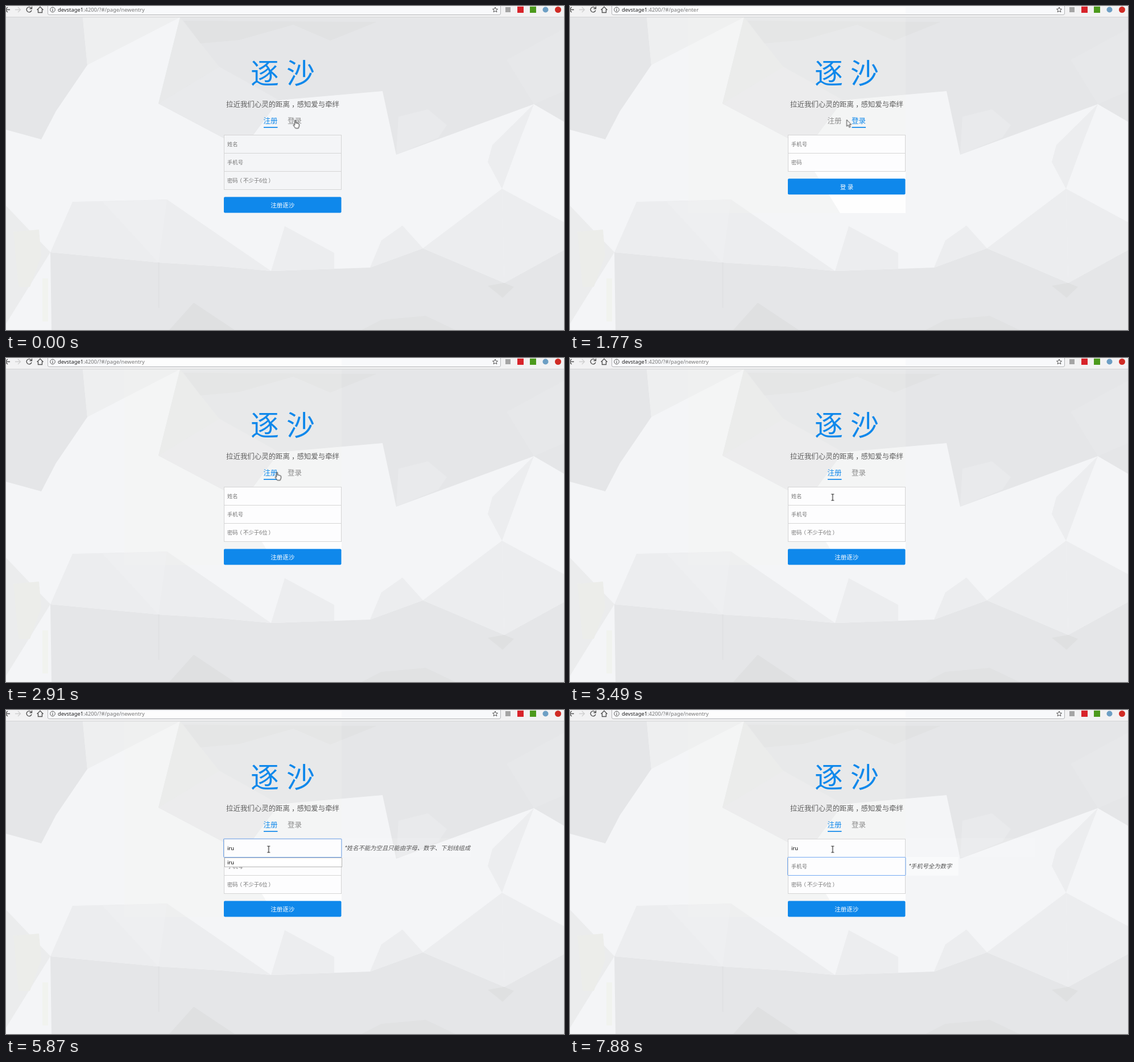
These frames come from a looping animation (981 px wide and 571 px high, 8 s). An HTML page:

```html
<!DOCTYPE html>
<html lang="zh-CN">
<head>
<meta charset="utf-8">
<title>注册</title>
<style>
html, body { margin: 0; width: 100%; height: 100%; overflow: hidden; background: #f4f5f7; }
svg { display: block; width: 981px; height: 571px; }
text { font-family: "Noto Sans CJK SC", "Noto Sans CJK", "Noto Sans", sans-serif; white-space: pre; }
.latin { font-family: "Noto Sans", "Open Sans", sans-serif; }
.url { font-size: 9.35px; fill: #777; }
.url tspan { fill: #222; }
.title { font-size: 50px; fill: #0f88eb; }
.slogan { font-size: 12.44px; fill: #5e5e5e; }
.tab { font-size: 12.5px; fill: #8c8c8c; }
.on { fill: #0f88eb; }
.hint { font-size: 9.33px; fill: #757575; }
.typed { font-size: 9.33px; fill: #000; }
.tip { font-size: 10.35px; font-style: italic; fill: #555; }
.btn { font-size: 10.5px; fill: #fff; text-anchor: middle; }
.field { fill: #fdfdfe; stroke: #d5d5d5; }
.ring { fill: none; stroke: #74a9f3; }
.caret { fill: #000; }
.icon { fill: none; stroke: #555; stroke-width: 1.4; }

/* every change is a hard cut on one 8 s clock */
.k { animation: 8s step-end infinite; }
.ghost { animation-name: ghost; }
.register { animation-name: register; }
.login { animation-name: login; }
.register .field { animation-name: whiten; }
.focus1 { animation-name: focus1; }
.focus2 { animation-name: focus2; }
.glow1 { animation-name: glow1; }
.empty { animation-name: empty; }
.first { animation-name: first; }
.full { animation-name: full; }
.caret1 { animation-name: caret1; }
.caret2 { animation-name: caret2; }
.popup { animation-name: popup; }
.hand { animation-name: hand; }
.arrow { animation-name: arrow; }
.beam { animation-name: beam; }

@keyframes ghost { 0% { opacity: 0 } 3.5% { opacity: 1 } }
@keyframes register { 0% { opacity: 1 } 3.5% { opacity: 0 } 36.375% { opacity: 1 } }
@keyframes login { 0% { opacity: 0 } 3.5% { opacity: 1 } 36.375% { opacity: 0 } }
@keyframes whiten { 0% { fill: #f4f5f7 } 3.5% { fill: #fdfdfe } }
@keyframes focus1 { 0% { opacity: 0 } 49.125% { opacity: 1 } 78.75% { opacity: 0 } }
@keyframes focus2 { 0% { opacity: 0 } 78.75% { opacity: 1 } }
@keyframes glow1 { 0% { opacity: 0 } 49.125% { opacity: 1 } }
@keyframes empty { 0% { opacity: 1 } 63.625% { opacity: 0 } }
@keyframes first { 0% { opacity: 0 } 63.625% { opacity: 1 } 66.75% { opacity: 0 } }
@keyframes full { 0% { opacity: 0 } 66.75% { opacity: 1 } }
@keyframes popup { 0% { opacity: 0 } 63.625% { opacity: 1 } 78.75% { opacity: 0 } }
@keyframes caret1 {
  0% { opacity: 0; transform: none }
  49.125% { opacity: 1; transform: none }
  54.875% { opacity: 0; transform: none }
  62.125% { opacity: 1; transform: none }
  63.625% { opacity: 1; transform: translateX(2px) }
  66.75% { opacity: 1; transform: translateX(12px) }
  73.375% { opacity: 0; transform: none }
}
@keyframes caret2 {
  0% { opacity: 0 } 78.75% { opacity: 1 } 85.25% { opacity: 0 }
  91.5% { opacity: 1 } 98.5% { opacity: 0 }
}
@keyframes hand {
  0% { opacity: 1; transform: translate(504.5px, 200.5px) }
  20.25% { opacity: 1; transform: translate(493px, 200.5px) }
  22.125% { opacity: 0; transform: none }
  24% { opacity: 1; transform: translate(472.5px, 200.5px) }
  25.5% { opacity: 0; transform: none }
  27.375% { opacity: 1; transform: translate(472.5px, 200.5px) }
  34.375% { opacity: 0; transform: none }
  36.375% { opacity: 1; transform: translate(472.5px, 200.5px) }
  38.25% { opacity: 0; transform: none }
}
@keyframes arrow {
  0% { opacity: 0; transform: none }
  22.125% { opacity: 1; transform: translate(486.5px, 200.5px) }
  24% { opacity: 0; transform: none }
  25.5% { opacity: 1; transform: translate(475.2px, 200.5px) }
  27.375% { opacity: 0; transform: none }
  34.375% { opacity: 1; transform: translate(475.2px, 200.5px) }
  36.375% { opacity: 0; transform: none }
  38.25% { opacity: 1; transform: translate(459px, 218px) }
  40.125% { opacity: 0; transform: none }
}
@keyframes beam {
  0% { opacity: 0; transform: none }
  40.125% { opacity: 1; transform: translate(459px, 239px) }
  41.75% { opacity: 1; transform: translate(459.5px, 242.5px) }
  43.625% { opacity: 1; transform: translate(461.7px, 245.5px) }
}
</style>
</head>
<body>
<svg viewBox="0 0 981 571">
  <!-- faceted backdrop -->
  <rect width="981" height="571" fill="#f4f5f7"/>
  <g fill="#e5e6e8">
    <path d="M0 20H135L143 104 88 185 62 235 0 218Z"/>
    <path d="M306 20H981V204L928 173 686 262 662 150 480 166 425 240 383 233 268 172Z"/>
    <path d="M78 434L268 452 380 459 466 467 640 461 733 427 876 488 981 430V571H80Z"/>
  </g>
  <g fill="#ecedef">
    <path d="M135 20H306L143 104Z" fill="#eeeff0"/>
    <path d="M117 345L283 341 466 467 380 459 268 452 78 434Z"/>
    <path d="M490 388L577 435V463L466 467Z"/>
    <path d="M640 461L660 413 697 387 733 427Z"/>
    <path d="M733 427L872 322 876 488Z"/>
    <path d="M928 173L905 232 872 322 847 275 855 245Z"/>
    <path d="M872 322L981 381V430L876 488Z"/>
    <path d="M0 352L78 434 0 560Z" fill="#ebeced"/>
    <path d="M686 262L690 195 742 182 775 210 760 232Z" fill="#e9eaec"/>
    <path d="M880 95L981 40V150L928 173Z" fill="#e7e8ea"/>
    <path d="M306 20L375 107 268 172Z" fill="#e8e9ea"/>
    <path d="M268 172L375 107 480 166 425 240 383 233Z" fill="#e9eaec"/>
    <path d="M170 345L283 341 268 452Z" fill="#eeeff1"/>
  </g>
  <path d="M13 398L58 394 62 440 42 495H22Z" fill="#ecedea"/>
  <path d="M64 480H74V556H64Z" fill="#f1f3ef"/>
  <g fill="#dfe0e1">
    <path d="M287 571L330 523 402 571Z"/>
    <path d="M625 571L660 553 738 546 790 571Z" fill="#e1e2e3"/>
    <path d="M312 26L652 28 570 61 505 33 410 60 342 66Z" fill="#e1e2e3"/>
    <path d="M847 493L876 488 893 495 873 514Z"/>
    <path d="M267 452H270V532H267Z" fill="#e1e2e4"/>
  </g>

  <!-- browser bar -->
  <rect width="981" height="19" fill="#f2f2f3"/>
  <path d="M0 19.5H981" stroke="#d2d3d4"/>
  <path d="M73.5 0V13Q73.5 15.5 76 15.5H867Q869.5 15.5 869.5 13V0" fill="#f8f9fb" stroke="#b5b6b8"/>
  <g class="icon">
    <path d="M7 6.5H-1M3 2L-1.500 6.500 3 11"/>
    <path d="M16 6.500H25M21 2L25.500 6.500 21 11" stroke="#d0d0d0"/>
    <path d="M44.500 4A4.500 4.500 0 1 0 45 7.500M45.500 1V4.800H41.500"/>
    <path d="M54.500 7L60 1.500 65.500 7M56.500 6V11.500H63.500V6"/>
    <circle cx="82" cy="6.500" r="4.300" stroke-width="1"/>
    <path d="M82 5.800V9M82 3.700V4.800" stroke-width="1.200"/>
    <path d="M860 2L861.300 5.100 864.500 5.400 862.100 7.500 862.900 10.700 860 9 857.100 10.700 857.900 7.500 855.500 5.400 858.700 5.100Z" stroke-width="1"/>
  </g>
  <rect x="878" y="2" width="9" height="9" fill="#a5a5a5"/>
  <rect x="899" y="1" width="11" height="11" fill="#d8232a"/>
  <rect x="921" y="1" width="11" height="11" fill="#4c9a1c"/>
  <circle cx="948.500" cy="6.500" r="5" fill="#6d9fc4"/>
  <circle cx="970.500" cy="6.500" r="5.500" fill="#d02c25"/>

  <!-- lighter areas left by repaints -->
  <g class="k ghost">
    <rect x="207" y="2" width="383" height="12" fill="#fdfdfd"/>
    <rect x="208" y="20" width="382" height="345" fill="#f3f4f2" opacity=".22"/>
    <path d="M430 292H590V365H475Z" fill="#fff" opacity=".8"/>
  </g>
  <rect class="k glow1" x="590" y="226" width="228" height="33" fill="#fff" fill-opacity=".1"/>
  <rect class="k focus2" x="590" y="259" width="93" height="33" fill="#fff" fill-opacity=".5"/>

  <text class="title" x="430" y="136.500">逐</text>
  <text class="title" x="493" y="136.500">沙</text>
  <text class="slogan" x="387" y="178">拉近我们心灵的距离<tspan dx="3">，</tspan><tspan dx="-3">感知爱与牵绊</tspan></text>

  <g class="k register">
    <text class="latin url" x="91" y="9.700"><tspan>devstage1</tspan>:4200/?#/page/newentry</text>
    <text class="tab on" x="452.500" y="206.500">注册</text>
    <text class="tab" x="495" y="206.500">登录</text>
    <rect class="on" x="453" y="213" width="24.500" height="1.700"/>
    <rect class="k field" x="383.500" y="227.500" width="206" height="96"/>
    <path d="M383 259.500H590M383 291.500H590" stroke="#d5d5d5"/>
    <text class="k hint empty" x="389" y="247.300">姓名</text>
    <text class="latin k typed first" x="389" y="247">i</text>
    <text class="latin k typed full" x="389" y="247">iru</text>
    <text class="hint" x="389" y="279.300">手机号</text>
    <text class="hint" x="389" y="311.300">密码<tspan dx="-2">（</tspan><tspan dx="2">不少于6位</tspan><tspan dx="2">）</tspan></text>
    <rect class="on" x="383" y="336.500" width="206.500" height="28" rx="2"/>
    <text class="btn" x="486.300" y="355">注册逐沙</text>
  </g>

  <g class="k login">
    <text class="latin url" x="91" y="9.700"><tspan>devstage1</tspan>:4200/?#/page/enter</text>
    <text class="tab" x="452.500" y="206.500">注册</text>
    <text class="tab on" x="495" y="206.500">登录</text>
    <rect class="on" x="495.500" y="213" width="24.500" height="1.700"/>
    <rect class="field" x="383.500" y="227.500" width="206" height="64"/>
    <path d="M383 259.500H590" stroke="#d5d5d5"/>
    <text class="hint" x="389" y="247.300">手机号</text>
    <text class="hint" x="389" y="278.800">密码</text>
    <rect class="on" x="383" y="304.300" width="206.500" height="28" rx="2"/>
    <text class="btn" x="486.500" y="322.800">登 录</text>
  </g>

  <g class="k focus1">
    <rect class="ring" x="382.500" y="227" width="207.500" height="32.500" rx="1"/>
    <text class="tip" x="594" y="246.500">*姓名不能为空且只能由字母、数字、下划线组成</text>
  </g>
  <g class="k focus2">
    <rect class="ring" x="382.500" y="259.500" width="207.500" height="32" rx="1"/>
    <text class="tip" x="594" y="278.800">*手机号全为数字</text>
  </g>
  <g class="k popup">
    <rect x="384.500" y="260.500" width="206" height="16" fill="#fff" stroke="#b4b4b4"/>
    <text class="latin typed" x="389" y="272">iru</text>
  </g>
  <rect class="k caret caret1" x="389" y="238" width="1" height="11"/>
  <rect class="k caret caret2" x="389" y="271" width="1" height="11"/>

  <!-- pointers -->
  <g stroke="#222" fill="#fff" stroke-linejoin="round">
    <path class="k hand" d="M3 9V1.500Q3.900 0 5 1.500V6Q6 5 7 6.200 8 5.500 9 6.800 10.500 6.300 11 8V11L9.500 15H4.500L.5 9.500Q1 8 3 9.500Z"/>
    <path class="k arrow" d="M0 0V11.500L2.700 9.200 4.600 13.500 6.500 12.600 4.600 8.500H8Z" stroke-width=".9"/>
    <path class="k beam" d="M-2.500 -5.500H-.8L0 -4.800 .8 -5.500H2.500M0 -4.800V4.800M-2.500 5.500H-.8L0 4.800 .8 5.500H2.500" fill="none" stroke-width="1.100"/>
  </g>
</svg>
</body>
</html>
```
